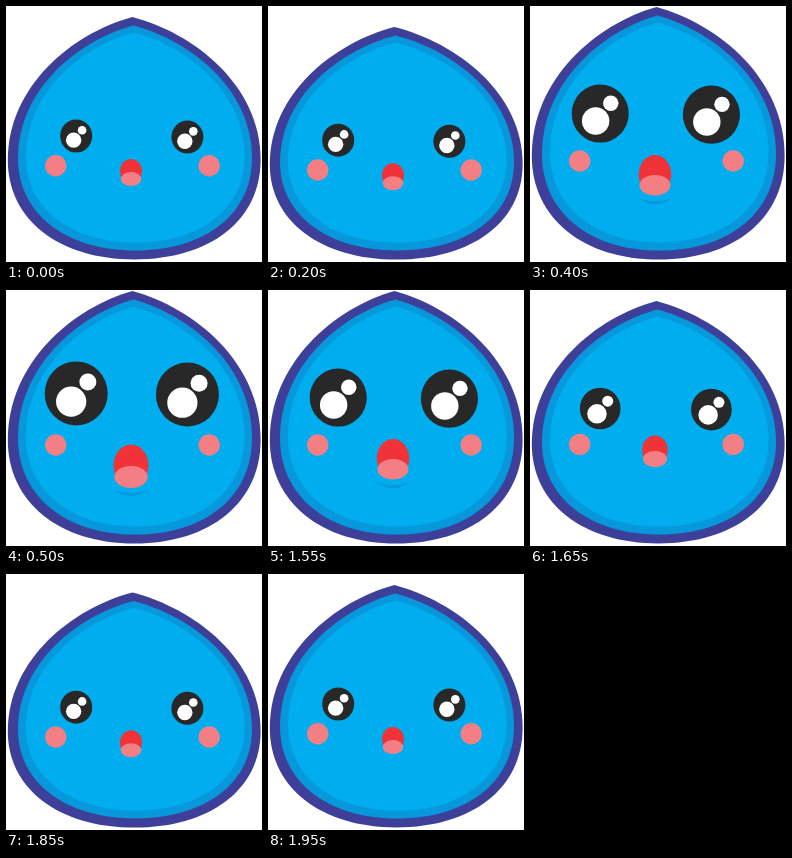
Write an HTML page with a canvas that moves like this. It is 256 px wide and 256 px high and loops after 2.1 s.

```html
<!DOCTYPE html>
<html lang="en">
<head>
<meta charset="utf-8">
<title>Surprised droplet</title>
<style>
  html, body { margin: 0; width: 100%; height: 100%; overflow: hidden; background: #fff; }
  canvas { display: block; }
</style>
</head>
<body>
<canvas id="stage" width="256" height="256"></canvas>
<script>
const ctx = document.getElementById('stage').getContext('2d');
const LOOP = 2100, STEP = 100, RELAX = 1550;
const BLUE = '#0798dc', RED = '#ef3338', PINK = '#f37f85';

// Key poses from calm to amazed: tip of the body, height of the cheeks, surprise.
const poses = [
  { top: 11, face: 159.8, surprise: 0 },
  { top: 18.5, face: 163, surprise: 0 },
  { top: 21, face: 164, surprise: 0 },
  { top: 11, face: 154.4, surprise: 0.28 },
  { top: 1, face: 155, surprise: 0.81 },
  { top: 1, face: 155, surprise: 1 }
];

function ellipse(color, x, y, rx, ry = rx) {
  ctx.fillStyle = color;
  ctx.beginPath();
  ctx.ellipse(x, y, rx, ry, 0, 0, Math.PI * 2);
  ctx.fill();
}

function drop(color, left, right, top, bottom) {
  const x = u => left + (right - left) * u;
  const y = v => top + (bottom - top) * v;
  ctx.fillStyle = color;
  ctx.beginPath();
  ctx.moveTo(x(0.493), y(0));
  ctx.bezierCurveTo(x(0.736), y(0.067), x(1), y(0.28), x(1), y(0.59));
  ctx.bezierCurveTo(x(1), y(0.838), x(0.8), y(1), x(0.5), y(1));
  ctx.bezierCurveTo(x(0.205), y(1), x(0), y(0.838), x(0), y(0.59));
  ctx.bezierCurveTo(x(0), y(0.285), x(0.255), y(0.067), x(0.493), y(0));
  ctx.fill();
}

function eye(x, y, r) {
  ellipse('#282828', x, y, r, r + 0.5);
  ellipse('#fff', x - r * 0.16, y + r * 0.26, r * 0.48);
  ellipse('#fff', x + r * 0.37, y - r * 0.36, r * 0.27);
}

function mouth(y, surprise) {
  const w = 11 + 6.5 * surprise, tongue = y + 8 + 3.5 * surprise;
  if (surprise > 0.5) {
    const chin = tongue + 13;
    ctx.fillStyle = BLUE;
    ctx.fill(new Path2D(`M${125 - w} ${chin} q${w} 12 ${2 * w} 0 q${-w} 6 ${-2 * w} 0Z`));
  }
  ellipse(RED, 125, y, w, 12 + 9 * surprise);
  ellipse(PINK, 125, tongue, w - 0.8, 7 + 4 * surprise);
}

function draw({ top, face, surprise }) {
  ctx.clearRect(0, 0, 256, 256);
  drop('#3d3f99', 1.8, 254.6, top, 253.5);
  drop(BLUE, 12, 246, top + 8.5, 244.5);
  drop('#00aeef', 20, 238.5, top + 15.5, 236.5);

  const eyeY = face - 29.8 - 21.8 * surprise, eyeR = 16 + 15.5 * surprise;
  eye(70.2, eyeY, eyeR);
  eye(181.4, eyeY + 1.1, eyeR);
  for (const x of [49.7, 203.2]) ellipse(PINK, x, face, 10.7);
  mouth(face + 5.3 + 15.2 * surprise ** 3, surprise);
}

// Step up to the last pose, hold it, then step back down.
function poseAt(t) {
  const up = Math.floor(t / STEP), down = 4 - Math.floor((t - RELAX) / STEP);
  return poses[Math.max(0, Math.min(up, down, 5))];
}

function tick() {
  draw(poseAt(performance.now() % LOOP));
  requestAnimationFrame(tick);
}
tick();
</script>
</body>
</html>
```
